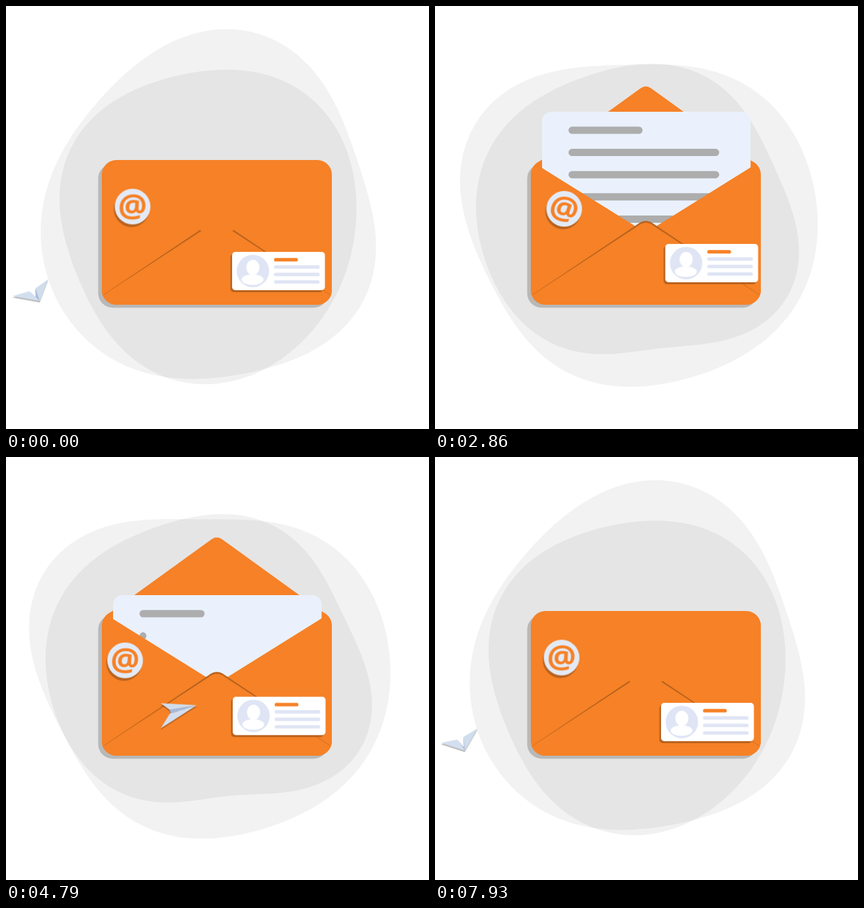
Recreate the animation shown at these times as an HTML page. Size 640 px wide and 640 px high, loop 8000 ms.

```html
<!DOCTYPE html>
<html lang="en">
<head>
<meta charset="utf-8">
<title>Mail</title>
<style>
  html, body { margin: 0; width: 100%; height: 100%; overflow: hidden; background: #fff; }
  svg { display: block; width: 100vw; height: 100vh; }
  .orange { fill: #f68126; }
  .brown { fill: #b9631f; }
  .pale { fill: #dfe5f4; }
  .flap, .paper, .line { animation: 4s linear infinite; }
  .front { animation-name: front; }
  .back { animation-name: back; }
  .paper { animation-name: paper; }
  .line { animation-name: type; fill: #adadad; width: 0; }
  .stamp, .tilt, .card { animation: 8s ease-in-out infinite; }
  .stamp { animation-name: stamp; }
  .tilt { animation-name: tilt; }
  .card { animation-name: card; }

  @keyframes front {
    0%, 2.5% { transform: none; animation-timing-function: ease-in; }
    8.25%, 89.25% { transform: scaleY(0); animation-timing-function: ease-out; }
    95.5%, 100% { transform: none; }
  }
  @keyframes back {
    0%, 8.25% { transform: scaleY(0); animation-timing-function: ease-out; }
    14%, 83% { transform: scaleY(-1); animation-timing-function: ease-in; }
    89.25%, 100% { transform: scaleY(0); }
  }
  @keyframes paper {
    0%, 11.25% { transform: translateY(185px); animation-timing-function: ease-in-out; }
    24.5%, 72.5% { transform: none; animation-timing-function: ease-in-out; }
    84.5%, 100% { transform: translateY(185px); }
  }
  @keyframes type {
    0% { width: 0; }
    6%, 74% { width: var(--w); }
    74.01%, 100% { width: 0; }
  }
  @keyframes stamp {
    0%, 100% { transform: translate(191.5px, 303.5px); }
    15% { transform: translate(203px, 308.5px); }
    50% { transform: translate(191.5px, 306px); }
    63.75% { transform: translate(178px, 308px); }
    78.75% { transform: translate(206px, 290px); }
  }
  @keyframes tilt {
    0%, 63.75%, 100% { transform: none; }
    15%, 50% { transform: rotate(15deg); }
    78.75% { transform: rotate(20deg); }
  }
  @keyframes card {
    0%, 100% { transform: translate(342px, 372px); animation-timing-function: linear; }
    35.75% { transform: translate(348.4px, 360px); }
    50% { transform: translate(338px, 363px); }
    69.6% { transform: translate(347.8px, 362.5px); }
    85.75% { transform: translate(341.3px, 362.5px); }
  }
</style>
</head>
<body>
<svg viewBox="0 0 640 640">
  <defs>
    <clipPath id="pocketClip"><rect x="140" y="100" width="360" height="330"/></clipPath>
    <path id="flapShape" d="M-165 0L-8 113.5Q0 119 8 113.5L165 0Z"/>
  </defs>

  <path id="outer" fill-opacity=".05"/>
  <path id="inner" fill-opacity=".055"/>
  <g id="behind"></g>

  <rect x="139.5" y="239" width="348" height="217.5" rx="22" fill="#b8b8b8"/>
  <g transform="translate(319 238)"><use href="#flapShape" class="flap back orange"/></g>
  <rect x="145" y="233" width="348" height="219" rx="22" class="orange"/>

  <g clip-path="url(#pocketClip)">
    <g class="paper" id="paper">
      <rect x="162" y="160" width="315.5" height="300" rx="14" fill="#eaf1fc"/>
    </g>
  </g>

  <path class="orange" d="M145 255L153 239.5L319 343L485 239.5L493 255V430a22 22 0 0 1-22 22H167a22 22 0 0 1-22-22Z"/>
  <path class="brown" d="M147 437L306 330.6Q319 320 332 330.6L491 437Z"/>
  <path class="orange" d="M147 437.6L306 333.5Q319 322.5 332 333.5L491 437.6Z"/>
  <g transform="translate(319 238)"><use href="#flapShape" class="flap front orange"/></g>

  <g class="stamp">
    <circle class="brown" cx="-1.5" cy="4" r="27"/>
    <circle r="27" fill="#e3eaf6"/>
    <g class="tilt">
      <text class="orange" y="17" text-anchor="middle" font-family="'Open Sans', 'Noto Sans', sans-serif" font-size="49" font-weight="700">@</text>
    </g>
  </g>

  <g class="card">
    <rect class="brown" x="-2.5" y="3" width="140" height="58" rx="5"/>
    <rect width="140.5" height="58" rx="5" fill="#fff"/>
    <circle class="pale" cx="31.5" cy="29" r="24.5"/>
    <ellipse cx="31.5" cy="23.5" rx="10" ry="11.5" fill="#fff"/>
    <ellipse cx="31" cy="42" rx="16.5" ry="8" fill="#fff"/>
    <rect class="orange" x="63.5" y="9.3" width="36" height="5.2" rx="2.6"/>
    <g class="pale">
      <rect x="63.5" y="20.3" width="69" height="5.2" rx="2.6"/>
      <rect x="63.5" y="31.6" width="69" height="5.2" rx="2.6"/>
      <rect x="63.5" y="42.9" width="69" height="5.2" rx="2.6"/>
    </g>
  </g>

  <g id="ahead">
    <g id="plane" transform="translate(307 325) rotate(-22)">
      <path id="shade" fill-opacity=".27" transform="translate(-1 2)"/>
      <path id="keel" fill="#a3bbdd"/>
      <path id="port" fill="#cfdded"/>
      <path id="starboard" fill="#d3dff0"/>
    </g>
  </g>
</svg>
<script>
const $ = id => document.getElementById(id);
const { sin, cos, PI } = Math;
const setPath = (id, d) => $(id).setAttribute('d', d);
const poly = pts => 'M' + pts.join('L') + 'Z';

// Text lines on the letter, typed one after another.
for (let i = 0; i < 5; i++) {
  const line = document.createElementNS('http://www.w3.org/2000/svg', 'rect');
  const attrs = { class: 'line', x: 202, y: 182.5 + 33.6 * i, height: 11, rx: 5.5 };
  for (const name in attrs) line.setAttribute(name, attrs[name]);
  line.style.setProperty('--w', (i ? 228 : 112) + 'px');
  line.style.animationDelay = 0.58 + 0.2 * i + 's';
  $('paper').append(line);
}

// Blob outline: mean radius, then [cos, sin] amounts of the first waves around it.
const outer = [
  { r: 256.6, waves: [[-1.4, -11.5], [-5.8, -4.5], [-3.8, 13.7], [0.9, 5]] },
  { r: 259.8, waves: [[1.2, -0.8], [15.3, 10.1], [3.3, -15.3], [-5.3, 6.1]] }
];
const inner = [
  { r: 231.1, waves: [[-1.7, 1.2], [-7.2, -1.4], [-1.7, -8.5], [-0.8, 3.2]] },
  { r: 232.3, waves: [[-6.4, -13.1], [16.3, 5.9], [-0.5, 13.7], [-3.8, 9.1]] }
];

const radius = (shape, a) => shape.waves.reduce(
  (r, [c, s], k) => r + c * cos((k + 1) * a) + s * sin((k + 1) * a), shape.r);

function blob([from, to], mix) {
  const pts = [];
  for (let i = 0; i < 120; i++) {
    const a = i * PI / 60;
    const r = radius(from, a) * (1 - mix) + radius(to, a) * mix;
    pts.push([310 + r * cos(a), 325 + r * sin(a)]);
  }
  return poly(pts);
}

// The plane circles the letter; the circle is seen at a slant.
function drawPlane(t) {
  const turn = t / 4000 * 2 * PI + 0.096;
  const heading = turn - PI / 2;
  const x = -287 * cos(turn), y = 38 * sin(turn);
  const at = (ahead, side, up = 0) => [
    x + ahead * cos(heading) + side * sin(heading),
    y + 0.6 * side * cos(heading) - 0.42 * ahead * sin(heading) - up
  ];
  const nose = at(31, 0), keel = at(-12, 0, -13);
  const tipP = at(-27, -30), foldP = at(-12, -5, 2);
  const tipS = at(-27, 30), foldS = at(-12, 5, 2);
  setPath('port', poly([nose, tipP, foldP]));
  setPath('starboard', poly([nose, foldS, tipS]));
  setPath('keel', poly([nose, foldP, keel, foldS]));
  setPath('shade', poly([nose, tipP, foldP, keel, foldS, tipS]));
  const layer = $(turn > PI && turn < 1.85 * PI ? 'behind' : 'ahead');
  if ($('plane').parentNode !== layer) layer.append($('plane'));
}

function draw() {
  const t = performance.now() % 8000;
  const mix = (1 - cos(t / 4000 * PI)) / 2;
  setPath('outer', blob(outer, mix));
  setPath('inner', blob(inner, mix));
  drawPlane(t % 4000);
  requestAnimationFrame(draw);
}
draw();
</script>
</body>
</html>
```
